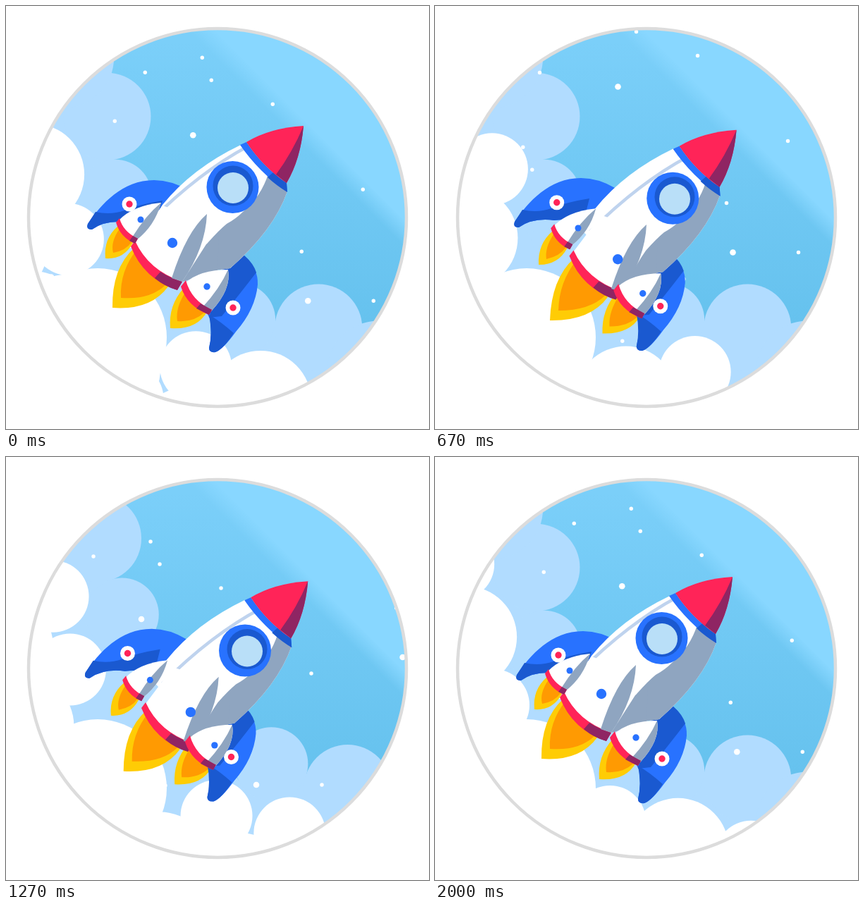
An HTML page with a canvas for the animation above (2030 ms loop, 600 px wide and 600 px high).

```html
<!DOCTYPE html>
<html lang="en">
<head>
<meta charset="utf-8">
<title>Rocket</title>
<style>
html, body { margin: 0; width: 100%; height: 100%; overflow: hidden; background: #fff }
canvas { display: block; width: 600px; height: 600px }
</style>
</head>
<body>
<canvas id="stage" width="600" height="600"></canvas>
<script>
const ctx = document.getElementById('stage').getContext('2d');
const LOOP = 2030, STEP = 100 / 3, TURN = 60, TAU = Math.PI * 2;
const BLUE = '#2872ff', NAVY = '#1a59d0', RED = '#ff2458', WINE = '#8f2563',
      GRAY = '#8fa5c0', YELLOW = '#ffcc05', ORANGE = '#ff9a02', HAZE = '#b1dcff';

// One constellation, flown past several times per loop
const constellation = [[0, 0, 1], [163, 235, 1], [-68, -89], [-111, -20], [154, 165],
  [256, 235], [13, -110], [26, -78], [113, -44], [241, 77]];
const COPIES = 5, SPEED = 15.25, TRAVEL = SPEED * TURN;

// Cloud wheels: puffs evenly spaced, swelling and shrinking around the rim
const PUFFS = 12;
const haze = { x: -60, y: 200, core: 212, turn: 6, phase: 18, cycles: 3, peak: 2,
               r: 62, swell: 10, dist: 208, sink: 18, color: HAZE };
const smoke = { x: -115, y: 295, core: 185, turn: 6.1, phase: 10, cycles: 4, peak: 1,
                r: 58, swell: 14, dist: 192, sink: 28, color: '#fff' };

function disc(x, y, r, color) {
  ctx.fillStyle = color;
  ctx.beginPath();
  ctx.arc(x, y, r, 0, TAU);
  ctx.fill();
}

function fill(path, color) {
  ctx.fillStyle = color;
  ctx.fill(new Path2D(path));
}

// Slide a part across the rocket's axis
function slide(sway, k) {
  ctx.setTransform(1, 0, 0, 1, k * sway, k * sway);
}

function sky() {
  let g = ctx.createLinearGradient(300, 50, 300, 450);
  g.addColorStop(0, '#7bcff9');
  g.addColorStop(1, '#66c2ee');
  ctx.fillStyle = g;
  ctx.fillRect(0, 0, 600, 600);
  g = ctx.createLinearGradient(412, 188, 431, 169);
  g.addColorStop(0, '#88d7ff00');
  g.addColorStop(1, '#88d7ff');
  ctx.fillStyle = g;
  ctx.fillRect(0, 0, 600, 600);
}

function wheel(w, n) {
  disc(w.x, w.y, w.core, w.color);
  for (let i = 0; i < PUFFS; i++) {
    const a = (w.phase + w.turn * n) * TAU / 360 - TAU * i / PUFFS;
    const wave = Math.cos(TAU * w.cycles * (i - w.peak) / PUFFS);
    const dist = w.dist - w.sink * wave;
    disc(w.x + dist * Math.cos(a), w.y + dist * Math.sin(a), w.r + w.swell * wave, w.color);
  }
}

// The right bank mirrors the left one in the rocket's axis
function clouds(w, n) {
  wheel(w, n);
  ctx.save();
  ctx.setTransform(0, -1, -1, 0, 600, 600);
  wheel(w, n);
  ctx.restore();
}

function stars(n) {
  for (let k = 0; k < COPIES; k++) {
    const along = TRAVEL * k / COPIES - 31 * Math.sin(Math.PI * k / COPIES) - SPEED * n;
    const u = (along + 2.5 * TRAVEL) % TRAVEL - TRAVEL / 2;
    const drift = -38 * Math.exp(-((k - 2) ** 2));
    for (const [x, y, big] of constellation)
      disc(266 + x + drift + u, 184 + y + drift - u, big ? 4.3 : 2.7, '#fff');
  }
}

function badge(x, y) {
  disc(x, y, 10.5, '#fff');
  disc(x, y, 4.7, RED);
}

function flames(s, n) {
  const f = 2 - 2 * Math.cos(TAU * n / 12), h = f / 2;
  slide(s, 20);
  fill(`M182 343Q150 372 ${151 - f} ${428 + f}Q205 432 230 398Z`, YELLOW);
  fill(`M186 345Q161 376 ${163 - f} ${414 + f}Q205 417 227 395Z`, ORANGE);
  slide(s, 10);
  fill(`M159 312Q138 330 ${141 - h} ${358 + h}Q167 360 180 336Z`, YELLOW);
  fill(`M161 316Q148 335 ${152 - h} ${350 + h}Q170 347 178 335Z`, ORANGE);
  slide(s, 8);
  fill(`M252 400Q230 425 ${233 - h} ${457 + h}Q270 460 285 434Z`, YELLOW);
  fill(`M255 405Q240 428 ${243 - h} ${447 + h}Q266 449 281 435Z`, ORANGE);
}

function fins(s) {
  slide(s, -4);
  fill('M260 262Q235 247 210 247C165 247 135 281 116 309Q113 317 122 317Q142 303 172 307L240 300Z', BLUE);
  fill('M116 309L127 292Q148 297 168 290Q190 281 222 276L215 304L172 307Q142 303 122 317Q113 317 116 309Z', NAVY);
  slide(s, -3);
  fill('M338 354Q358 372 357 395Q354 430 326 462Q308 487 297 491Q288 492 288 485Q293 465 290 445L282 430L310 365Z', BLUE);
  fill('M338 354Q351 365 355 378Q332 408 306 440L288 442L310 365Z', NAVY);
  fill('M288 438Q304 447 323 464Q308 487 297 491Q288 492 288 485Q293 465 288 438Z', NAVY);
  badge(175, 281);
  badge(322, 428);
}

function porthole(s, n) {
  slide(s, 21);
  disc(321.5, 257, 37, BLUE);
  disc(322 + 3 * s, 255, 28.5, NAVY);
  ctx.save();
  ctx.beginPath();
  ctx.arc(322 + 3 * s, 258, 22, 0, TAU);
  ctx.fillStyle = '#b9dff8';
  ctx.fill();
  ctx.clip();
  const glint = Math.max(0, 24 - 6 * Math.abs(n - 14), 9 - 2 * Math.abs(n - 49));
  ctx.translate(324, 247);
  ctx.rotate(.37);
  ctx.fillStyle = '#fff';
  ctx.fillRect(-30, -glint / 2, 60, glint);
  ctx.restore();
}

function hull(s, n) {
  const body = new Path2D('M333 197Q264 230 222 282L203 312L262 380L318 372Q380 318 399 263Q362 235 333 197Z');
  slide(s, 7);
  ctx.fillStyle = '#fff';
  ctx.fill(body);
  ctx.save();
  ctx.clip(body);
  slide(s, 16);
  fill('M372 238L400 240V390L255 398Q266 365 287 335Q302 318 313 309Q326 302 336 292Q362 270 372 238Z', GRAY);
  slide(s, 20);
  ctx.strokeStyle = '#bfd3ee';
  ctx.lineWidth = 4.5;
  ctx.stroke(new Path2D('M345 198Q275 235 205 305'));
  ctx.restore();

  slide(s, 7.5);
  fill('M341 193Q364 228 398 251L399 264Q358 235 332 197Z', BLUE);
  fill('M379 236Q388 245 398 251L399 264Q384 255 371 243Z', NAVY);
  fill('M422 170Q374 173 341 193Q364 228 398 251Q418 217 422 170Z', RED);
  fill('M422 170Q406 208 383 239L398 251Q418 217 422 170Z', WINE);

  porthole(s, n);

  slide(s, 18);
  fill('M222 283L183 335Q202 376 250 392L283 335L270 300Z', '#fff');
  fill('M284 338L250 391L300 378L302 322Z', GRAY);
  fill('M183 333Q202 375 250 391L243 403Q195 387 177 341Z', RED);
  fill('M219 377Q233 386 250 391L243 403Q225 398 211 386Z', WINE);
  slide(s, 20);
  fill('M285 295Q256 320 235 386L250 391Q283 343 285 295Z', GRAY);
  slide(s, 31);
  disc(236, 336, 7.2, BLUE);
}

function boosters(s) {
  slide(s, 11);
  fill('M220 279Q180 283 160 304Q166 322 185 332Q211 312 220 279Z', '#fff');
  fill('M220 279Q198 297 179 328L185 332Q211 312 220 279Z', GRAY);
  fill('M161 301Q166 320 187 330L183 337Q162 328 156 307Z', RED);
  fill('M180 326L187 330L183 337L175 333Z', WINE);
  slide(s, 16);
  disc(191, 303, 4.5, BLUE);
  slide(s, 7);
  fill('M315 374Q275 374 254 393Q264 420 291 433Q320 402 315 374Z', '#fff');
  fill('M315 374Q303 401 279 427L291 433Q320 402 315 374Z', GRAY);
  fill('M255 389Q263 418 292 431L288 438Q257 426 248 398Z', RED);
  fill('M276 422L292 431L288 438L270 429Z', WINE);
  slide(s, 13);
  disc(285, 398, 4.7, BLUE);
}

function rocket(n) {
  const sway = (1 - Math.cos(TAU * n / TURN)) / 2;
  ctx.save();
  flames(sway, n);
  fins(sway);
  hull(sway, n);
  boosters(sway);
  ctx.restore();
}

function draw(n) {
  const rim = new Path2D();
  rim.arc(300, 300, 268, 0, TAU);
  ctx.fillStyle = '#fff';
  ctx.fillRect(0, 0, 600, 600);
  ctx.save();
  ctx.clip(rim);
  sky();
  disc(130, 470, 185, HAZE);
  clouds(haze, n);
  stars(n);
  clouds(smoke, n);
  disc(130, 470, 98, '#fff');
  disc(95, 505, 125, '#fff');
  rocket(n);
  ctx.restore();
  ctx.strokeStyle = '#dcdcdc';
  ctx.lineWidth = 4.5;
  ctx.stroke(rim);
}

const start = performance.now();
function tick() {
  const t = (performance.now() - start) % LOOP;
  draw(Math.floor((t + 3.4) / STEP));
  requestAnimationFrame(tick);
}
tick();
</script>
</body>
</html>
```
